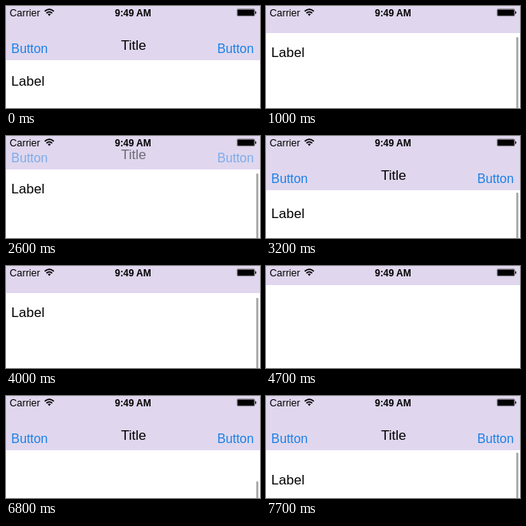
Recreate the animation shown at these times as an HTML page. Size 318 by 128 pixels, loop 8 s.

```html
<!DOCTYPE html>
<html lang="en">
<head>
<meta charset="utf-8">
<title>Collapsing navigation bar</title>
<style>
  html, body { margin: 0; width: 100%; height: 100%; overflow: hidden; background: #fff; }
  svg { display: block; width: 100vw; height: 100vh; }
  text { font-family: "Liberation Sans", Arial, sans-serif; font-size: 17px; }
  .status { font-size: 12.5px; }
  .clock { font-size: 12px; font-weight: bold; }
  .button { font-size: 15.8px; fill: #1a80e6; }
</style>
</head>
<body>
<svg viewBox="0 0 318 128">
  <rect width="318" height="128" fill="#fff"/>
  <text id="label" x="6.6">Label</text>
  <rect id="thumb" x="313.3" width="2.6" height="140" rx="1.3" fill="#a6a6a6"/>
  <rect id="bar" width="318" fill="#e0d7ee"/>
  <g id="items">
    <text class="button" x="6.6">Button</text>
    <text x="159.7" y="-4" text-anchor="middle">Title</text>
    <text class="button" x="264.5">Button</text>
  </g>
  <text class="status" x="4.5" y="12.7">Carrier</text>
  <g fill="none" stroke="#000" stroke-width="1.7">
    <path d="M48.5 6.6 Q54.2 1.6 59.9 6.6"/>
    <path d="M50.6 9 Q54.2 5.8 57.8 9"/>
    <path d="M52.3 10.3 Q54.2 8.8 56.1 10.3 L54.2 12.6 Z" fill="#000" stroke="none"/>
  </g>
  <text class="clock" x="159" y="12.7" text-anchor="middle">9:49 AM</text>
  <rect x="289.3" y="3.8" width="22" height="8.8" rx="1.2" fill="none" stroke="#444" stroke-width=".6"/>
  <rect x="289.9" y="4.4" width="20.8" height="7.6" rx=".6"/>
  <rect x="312" y="6.6" width="1.2" height="3.2" rx=".6"/>
</svg>
<script>
const LOOP = 8000, STEP = 100;
const OPEN = 68, CLOSED = 24;

const clamp = (v, lo = 0, hi = 1) => Math.min(hi, Math.max(lo, v));
const smooth = p => p * p * (3 - 2 * p);
const easeOut = p => 1 - (1 - p) ** 3;
const progress = (t, from, to) => clamp((t - from) / (to - from));

// Finger movements: each carries the page on to a new scroll offset.
const swipes = [
  { from: 300, to: 600, offset: 29 },
  { from: 700, to: 1500, offset: 50 },
  { from: 2200, to: 3100, offset: -3.5 },
  { from: 3100, to: 3600, offset: 0 },
  { from: 3700, to: 4000, offset: 36 },
  { from: 4000, to: 4700, offset: 1480 },
  { from: 6300, to: 6400, offset: 714 },
  { from: 6700, to: 7700, offset: -11, ease: easeOut }
];

function scrollAt(t) {
  return swipes.reduce((y, { from, to, offset, ease = smooth }) =>
    y + (offset - y) * ease(progress(t, from, to)), 0);
}

// The bar shrinks with the scroll, and springs open far down the page.
function barAt(t, scroll) {
  const reveal = CLOSED + 48 * progress(t, 5700, 5900) ** 2;
  return Math.round(clamp(Math.max(OPEN + 2 - scroll, reveal), CLOSED, OPEN));
}

function thumbAlpha(t) {
  if (t < 400) return 0;
  return t < 3800 ? 1 - progress(t, 3200, 3600) : 1;
}

const el = id => document.getElementById(id);
const label = el("label"), thumb = el("thumb"), bar = el("bar"), items = el("items");

function draw(time) {
  const t = Math.floor(time % LOOP / STEP) * STEP;
  const scroll = scrollAt(t);
  const h = barAt(t, scroll);
  bar.setAttribute("height", h);
  items.setAttribute("transform", `translate(0 ${h - 9})`);
  items.setAttribute("opacity", clamp((h - 34) / 16));
  label.setAttribute("y", Math.round(94 - scroll) + 6);
  thumb.setAttribute("y", Math.round(h + 3 + 0.07 * Math.max(0, scroll)));
  thumb.setAttribute("opacity", thumbAlpha(t));
}

const start = performance.now();
function tick() {
  draw(performance.now() - start);
  requestAnimationFrame(tick);
}
tick();
</script>
</body>
</html>
```
